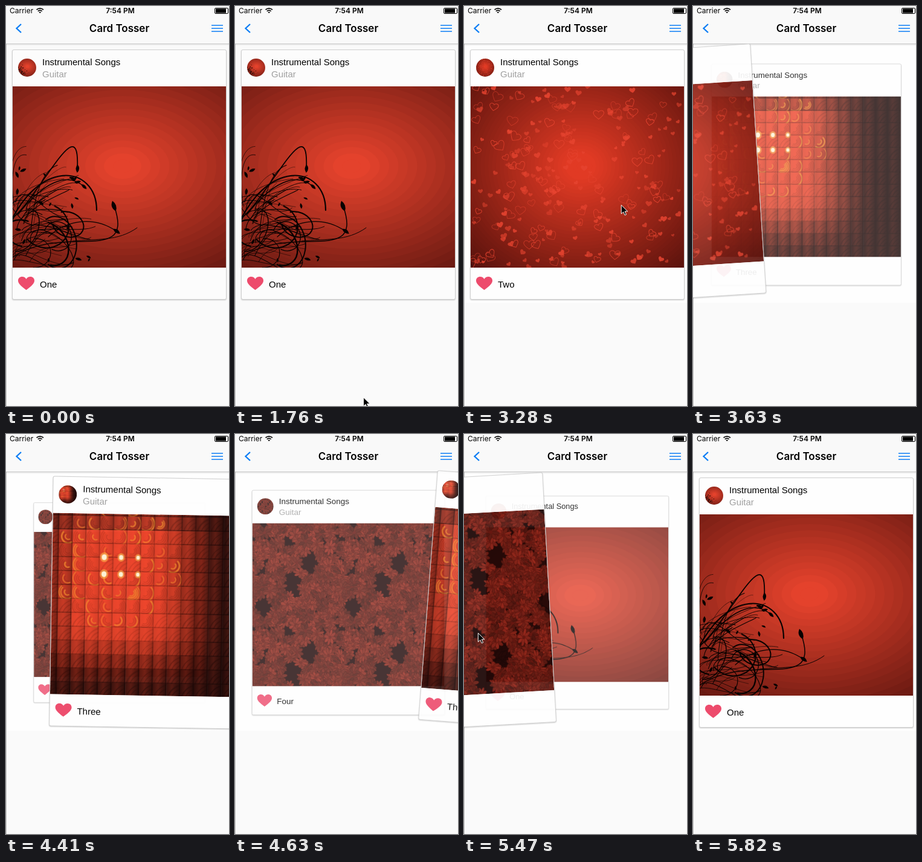
These frames come from a looping animation (369x662 px, 6.87 s). An HTML page with a canvas:

```html
<!DOCTYPE html>
<html lang="en">
<head>
<meta charset="utf-8">
<title>Card Tosser</title>
<style>
html, body { margin: 0; width: 100%; height: 100%; overflow: hidden; background: #fafafa; }
#stage { position: relative; width: 369px; height: 662px; overflow: hidden; background: #fafafa; color: #000;
  font: 15px/18px "Liberation Sans", Arial, sans-serif; }
#stage * { position: absolute; white-space: nowrap; }
#wash { left: 0; top: 66px; width: 369px; height: 425px; background: #fefefe; }
#edge { left: 0; top: 20px; width: 1px; height: 642px; background: #c6c6c6; }
#nav { left: 0; top: 0; width: 369px; height: 62px; background: #f9f9f9;
  border-bottom: 1px solid #cdcdcd; box-shadow: 0 1px 2px rgba(0,0,0,.13); }
.status { top: 0; font: 12px/16px Inter, sans-serif; }
#clock { left: 0; width: 378px; text-align: center; font-weight: 600; }
#title { left: 0; top: 27px; width: 375px; text-align: center; font: 600 17px/20px Inter, sans-serif; }
#deck { isolation: isolate; }
svg { left: 0; top: 0; overflow: visible; }
.card { left: 10px; top: 72px; width: 353px; height: 412px; border: 1px solid #cfcfcf; border-radius: 3px;
  box-shadow: 0 1px 2px rgba(0,0,0,.2); background: #fcfcfc; }
.late .card { background: #fefefe; }
.photo { left: 0; top: 60px; }
.thumb { left: 9px; top: 14px; border-radius: 50%; }
.name { left: 49px; top: 11px; }
.note { left: 49px; top: 31px; color: #a0a0a0; }
.label { left: 45px; top: 379px; }
.card svg { left: 9px; top: 375px; }
</style>
</head>
<body>
<div id="stage">
  <div id="wash"></div>
  <div id="edge"></div>
  <div id="nav">
    <span class="status" style="left:6px">Carrier</span>
    <span class="status" id="clock">7:54 PM</span>
    <div id="title">Card Tosser</div>
    <svg width="369" height="62" fill="none">
      <g stroke="#000" stroke-width="1.7">
        <path d="M50.5 6.2Q56.2 1.4 62 6.2M52.8 8.6Q56.2 5.8 59.7 8.6"/>
        <path d="M54.4 10.2L56.2 12L58 10.2Q56.2 9 54.4 10.2Z" fill="#000" stroke="none"/>
      </g>
      <rect x="345.5" y="3.5" width="22" height="9" rx="1.5" stroke="#000"/>
      <rect x="347" y="4.5" width="17" height="7" fill="#000"/>
      <path d="M25 30L17.5 37L25 44" stroke="#0a7cf5" stroke-width="2.3"/>
      <path d="M340 32H359M340 37H359M340 42H359" stroke="#0a7cf5" stroke-width="1.6"/>
    </svg>
  </div>
  <div id="deck"></div>
  <svg id="cursor" width="14" height="20"><path d="M.5 .5V15L4 11.8L6.4 17.2L8.8 16.1L6.4 10.9H11Z" fill="#000" stroke="#fff"/></svg>
</div>
<script>
const LOOP = 6870, W = 353, H = 300;
const HEART = 'M13.5 22C4 15 0 11 0 6.5C0 2.5 3 0 6.8 0C9.8 0 12.1 1.6 13.5 4C14.9 1.6 17.2 0 20.2 0C24 0 27 2.5 27 6.5C27 11 23 15 13.5 22Z';
const heartPath = new Path2D(HEART);
const $ = id => document.getElementById(id);
const clamp = v => Math.max(0, Math.min(1, v));
const lerp = (a, b, k) => a + (b - a) * k;
const easeOut = k => 1 - Math.pow(1 - clamp(k), 3);
const smooth = (a, b, v) => { const k = clamp((v - a) / (b - a)); return k * k * (3 - 2 * k); };
const mix = (a, b, k) => a.map((v, i) => lerp(v, b[i], clamp(k)));
const rgb = (c, a = 1) => `rgba(${c.map(Math.round)},${a})`;

function random(seed) {
  return (lo = 0, hi = 1) => {
    seed = (seed * 1664525 + 1013904223) % 4294967296;
    return lerp(lo, hi, seed / 4294967296);
  };
}

function oval(g, x, y, rx, ry, turn = 0) {
  g.beginPath();
  g.ellipse(x, y, rx, ry, turn, 0, 7);
  g.fill();
}

// Concentric flat ovals, light in the middle
function glow(g, inner, outer, steps, reach, ratio) {
  g.fillStyle = rgb(outer);
  g.fillRect(0, 0, W, H);
  for (let i = steps; i > 0; i--) {
    const k = i / steps;
    g.fillStyle = rgb(mix(inner, outer, k - .1));
    oval(g, 182, 132, reach * k, reach * k * ratio);
  }
}

function leaf(g, x, y, turn, size) {
  g.save();
  g.translate(x, y);
  g.rotate(turn);
  g.beginPath();
  g.moveTo(-size, 0);
  g.quadraticCurveTo(0, -size * .9, size, 0);
  g.quadraticCurveTo(0, size * .7, -size, 0);
  g.fill();
  g.restore();
}

// A tapering cubic stem, with a leaf at its tip
function stem(g, width, size, [x, y, ax, ay, bx, by, tx, ty]) {
  g.lineWidth = width;
  g.beginPath();
  g.moveTo(x, y);
  g.bezierCurveTo(ax, ay, bx, by, tx, ty);
  g.stroke();
  if (size) leaf(g, tx, ty, Math.atan2(ty - by, tx - bx), size);
}

function paintVine(g) {
  glow(g, [228, 66, 44], [90, 20, 14], 20, 310, .68);
  g.strokeStyle = g.fillStyle = '#080201';
  g.lineCap = 'round';
  stem(g, 1.8, 7, [-6, 223, 44, 187, 112, 30, 107, 136]);
  stem(g, 2.2, 0, [-11, 242, 39, 115, 139, 130, 139, 205]);
  stem(g, 1.5, 9, [-6, 287, 79, 222, 203, 300, 168, 198]);
  stem(g, 1.2, 7, [59, 249, 94, 217, 139, 217, 172, 240]);
  stem(g, 1, 0, [99, 256, 139, 252, 174, 257, 206, 234]);
  stem(g, 1.4, 6, [9, 212, 49, 160, 90, 140, 118, 166]);
  const r = random(18);
  for (let i = 0; i < 9; i++) {
    const a = r(0, 6);
    g.lineWidth = r(1, 2.6);
    g.beginPath();
    g.ellipse(r(5, 95), r(225, 280), r(22, 44), r(20, 38), r(0, 3), a, a + r(3, 5.2));
    g.stroke();
  }
  // Fine hairs fan out of the corner
  for (let i = 0; i < 46; i++) {
    const x = r(-10, 40), y = r(190, 290), a = r(-1.45, .35), n = r(50, 120);
    const tx = x + Math.cos(a) * n, ty = y + Math.sin(a) * n;
    stem(g, r(.4, 1.2), 0, [x, y, x + r(-10, 20), y - r(10, 45), tx - r(10, 40), ty + r(-10, 20), tx, ty]);
  }
  for (let i = 0; i < 20; i++) {
    const x = r(5, 130);
    leaf(g, x, r(110 + x * .3, 290), r(0, 3), r(3, 6));
  }
}

function paintHearts(g) {
  glow(g, [225, 58, 36], [75, 14, 10], 40, 255, .9);
  const r = random(7);
  for (let i = 0; i < 260; i++) {
    const solid = i % 3, size = solid ? r(.2, .42) : r(.4, .7);
    g.save();
    g.translate(r(0, W), r(0, H));
    g.rotate(r(-.7, .7));
    g.scale(size, size);
    g.translate(-13, -11);
    g.strokeStyle = g.fillStyle = rgb([230, 68, 48], r(.45, .9));
    g.lineWidth = 1 / size;
    if (solid) g.fill(heartPath); else g.stroke(heartPath);
    g.restore();
  }
}

function paintGlass(g) {
  const r = random(31), cw = 22.7, ch = 23, dark = [22, 4, 3];
  for (let y = -19; y < H; y += ch) for (let x = -12; x < W; x += cw) {
    const cx = x + cw / 2, cy = y + ch / 2, far = Math.hypot(cx - 112, cy - 92);
    const light = (1 - smooth(165, 320, cx)) * (1 - .85 * smooth(180, 310, cy)) * lerp(.65, 1, smooth(-5, 55, cx)) * lerp(.6, 1, smooth(0, 40, cy));
    const base = mix(dark, [240, 70, 44], light), depth = lerp(.75, .12, light);
    const shade = g.createLinearGradient(x, y, x + cw, y);
    shade.addColorStop(0, rgb(mix(base, dark, depth * .3)));
    shade.addColorStop(.4, rgb(mix(base, [240, 70, 44], .12)));
    shade.addColorStop(1, rgb(mix(base, dark, depth)));
    g.fillStyle = shade;
    g.fillRect(x, y, cw + .5, ch + .5);
    g.save();
    g.beginPath();
    g.rect(x, y, cw, ch);
    g.clip();
    const warm = far < 105 && far > 25, side = cx < 112 ? 1 : -1;
    for (let k = 0; k < 4; k++) {
      g.strokeStyle = warm && r() < .3 ? rgb([242, 145, 45], .75) : rgb(mix(base, dark, .55), .15 + depth * .6);
      g.lineWidth = r(1, 2.5);
      g.beginPath();
      if (warm) g.arc(cx + side * 4, cy, 5 + k * 3, 1.57 - side * .6, 1.57 + side * 2.4, side < 0);
      else g.arc(x + cw + 8, y + ch + 8, 12 + k * 6, 3, 4.8);
      g.stroke();
    }
    g.restore();
    g.fillStyle = rgb(dark, .12 + depth * .6);
    g.fillRect(x, y + ch - 2, cw, 2);
    g.fillRect(x + cw - 2, y, 2, ch);
  }
  for (let i = 0; i < 6; i++) {
    const x = 86 + i % 3 * 28, y = i < 3 ? 72 : 100, size = 6 - i % 3;
    g.fillStyle = 'rgba(255,190,80,.6)';
    oval(g, x, y, size + 1, size + 2);
    g.fillStyle = '#fff6d8';
    oval(g, x, y, size * .7, size * .8);
  }
}

function paintDaisies(g) {
  const T = 165, r = random(12), tile = document.createElement('canvas'), q = tile.getContext('2d');
  const gaps = [[14, 157], [104, 72], [74, 112]];
  tile.width = tile.height = T;
  q.fillStyle = '#1b0403';
  q.fillRect(0, 0, T, T);
  for (let i = 0; i < 300; i++) {
    const x = r(0, T), y = r(0, T), turn = r(0, 6), size = r(9, 14), tone = r(.6, 1), flat = r(.45, 1);
    if (gaps.some(([a, b]) => Math.hypot(x - a, y - b) < 21)) continue;
    for (const ox of [-T, 0, T]) for (const oy of [-T, 0, T]) {
      q.save();
      q.translate(x + ox, y + oy);
      q.rotate(turn);
      q.scale(1, flat);
      for (let p = 0; p < 8; p++) {
        q.rotate(Math.PI / 4);
        q.fillStyle = rgb([152, 38, 25].map(c => c * (tone - p % 3 * .08)));
        q.strokeStyle = 'rgba(45,8,5,.5)';
        q.lineWidth = .7;
        oval(q, size * .6, 0, size * .5, 3.2);
        q.stroke();
      }
      q.fillStyle = '#64140d';
      oval(q, 0, 0, 3, 3);
      q.restore();
    }
  }
  g.fillStyle = g.createPattern(tile, 'repeat');
  g.fillRect(0, 0, W, H);
}

function makeCard([label, paint]) {
  const card = document.createElement('div');
  card.className = 'card';
  card.innerHTML = `<canvas class="thumb" width="30" height="30"></canvas>
    <span class="name">Instrumental Songs</span><span class="note">Guitar</span>
    <canvas class="photo" width="${W}" height="${H}"></canvas>
    <svg width="27" height="22"><path d="${HEART}" fill="#ed4b6c"/></svg><span class="label">${label}</span>`;
  const photo = card.querySelector('.photo');
  paint(photo.getContext('2d'));
  card.querySelector('.thumb').getContext('2d').drawImage(photo, 0, 0, 30, 30);
  $('deck').append(card);
  return card;
}
const cards = [['One', paintVine], ['Two', paintHearts], ['Three', paintGlass], ['Four', paintDaisies]].map(makeCard);

// The pointer sets off at `from`, takes hold at x at `grab`, then pulls at a steady speed
const SPEED = 1.11, PULL = 370, ENTER = 180, HOLD_Y = 329;
const swipes = [
  { from: 1760, grab: 2478, x: 246, dir: 1 },
  { from: 3190, grab: 3400, x: 243, dir: -1 },
  { from: 4070, grab: 4353, x: 310, dir: 1 },
  { from: 4800, grab: 5270, x: 246, dir: -1 }
];

function pointerAt(t, now, last, dx) {
  if (!now || t < now.from) return [-40, HOLD_Y];
  const [x, y] = last ? [last.dir > 0 ? 385 : -16, HOLD_Y] : [212, 649];
  const k = easeOut((t - now.from) / (now.grab - now.from) / .85);
  return [lerp(x, now.x, k) + dx, lerp(y, HOLD_Y, k)];
}

function draw(t) {
  const done = swipes.filter(s => t >= s.grab + PULL).length;
  const top = done % 4, under = (done + 1) % 4, last = swipes[done - 1], now = swipes[done];
  const enter = last ? easeOut((t - last.grab - PULL) / ENTER) : 1;
  const dx = now ? now.dir * SPEED * Math.max(0, t - now.grab) : 0, reach = Math.abs(dx);
  cards.forEach((card, i) => {
    const s = card.style;
    s.display = i === top || (i === under && dx) ? '' : 'none';
    if (i === top) {
      s.zIndex = 2;
      s.opacity = lerp(.8, 1, enter) * (1 - reach / 3200);
      s.transform = dx || enter < 1
        ? `translate(${dx}px,${Math.min(1, reach / 190)}px) rotate(${dx / 70}deg) scale(${lerp(.9, 1, enter)})` : 'none';
    } else {
      s.zIndex = 1;
      s.opacity = .8;
      s.transform = `scale(${Math.min(.9, .8 + .086 * Math.pow(reach / 256, 3.4))})`;
    }
  });
  const late = t >= swipes[0].grab;
  $('stage').className = late ? 'late' : '';
  $('wash').style.display = late ? '' : 'none';
  const [x, y] = pointerAt(t, now, last, dx);
  $('cursor').style.transform = `translate(${x}px,${y}px)`;
}

const start = performance.now();
function tick() {
  draw((performance.now() - start) % LOOP);
  requestAnimationFrame(tick);
}
tick();
</script>
</body>
</html>
```
